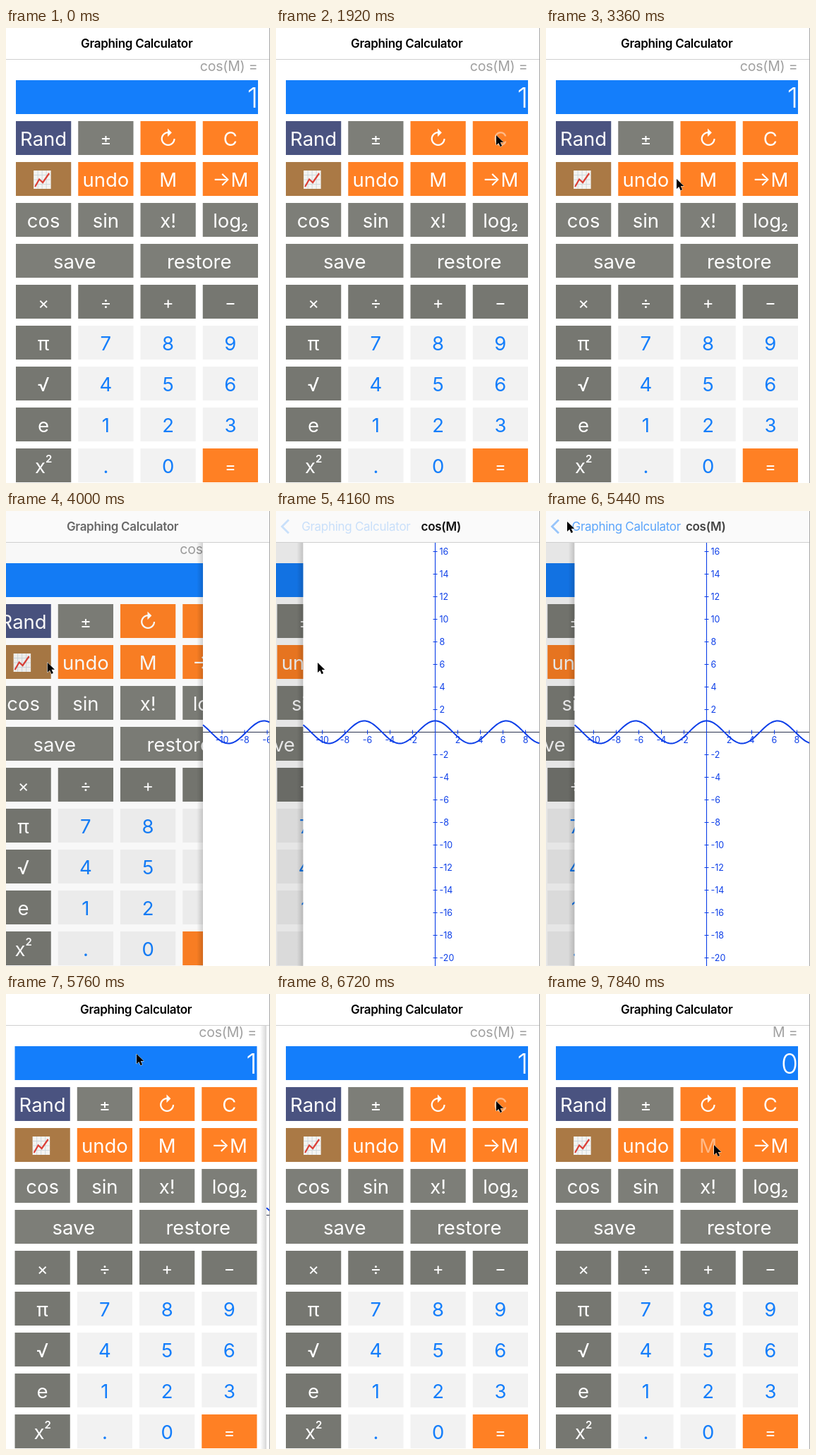
An HTML page for the animation above (8000 ms loop, 374 px wide and 645 px high).

```html
<!DOCTYPE html>
<html lang="en">
<head>
<meta charset="utf-8">
<title>Graphing Calculator</title>
<style>
html, body { margin: 0; width: 100%; height: 100%; overflow: hidden; background: #fff; }
svg { display: block; width: 100vw; height: 100vh; }
text { font-family: Inter, "DejaVu Sans", sans-serif; }
</style>
</head>
<body>
<svg id="stage" viewBox="0 0 374 645">
  <defs>
    <linearGradient id="shade"><stop offset="0" stop-opacity="0"/><stop offset="1" stop-opacity=".16"/></linearGradient>
  </defs>
  <rect width="374" height="645" fill="#fff"/>
  <g id="calc">
    <rect x="14" y="74" width="343" height="48" fill="#147efb"/>
    <text id="formula" x="356.5" y="61" font-size="19.5" letter-spacing="-.2" text-anchor="end" fill="#a0a0a0"></text>
    <text id="value" x="357" y="112.5" font-size="39" font-weight="300" text-anchor="end" fill="#fff"></text>
  </g>
  <rect id="dim" width="374" height="645"/>
  <g id="graph">
    <rect x="-9" width="9" height="645" fill="url(#shade)"/>
    <rect width="374" height="645" fill="#fff"/>
  </g>
  <rect id="bar" width="374" height="44" fill="#fff"/>
  <path d="M0 44.5H374" stroke="#cfcfcf"/>
  <path id="chevron" d="M18 12.5L8.5 22L18 31.5" fill="none" stroke="#147efb" stroke-width="2.8"/>
  <text id="home" y="28" font-size="17" font-weight="600" letter-spacing="-.3">Graphing Calculator</text>
  <text id="back" y="28" font-size="17" letter-spacing="-.3" fill="#147efb">Graphing Calculator</text>
  <text id="plotTitle" y="28" font-size="17" font-weight="600" letter-spacing="-.3" text-anchor="middle" fill="#111">cos(M)</text>
  <path d="M373.5 0V645" stroke="#a8a8a8"/>
  <path id="pointer" d="M0 0V14L3.3 11L5.7 16.2L8.1 15.1L5.8 10H10.2Z" fill="#000" stroke="#fff" stroke-width="1" paint-order="stroke"/>
</svg>
<script>
const $ = id => document.getElementById(id);
const DURATION = 8000, STEP = 160, WIDTH = 374;
const PUSH = 3946, POP = 5409;

function add(parent, tag, attrs, content) {
  const el = document.createElementNS("http://www.w3.org/2000/svg", tag);
  for (const key in attrs) el.setAttribute(key, attrs[key]);
  if (content !== undefined) el.textContent = content;
  parent.append(el);
  return el;
}
const set = (id, attrs) => {
  for (const key in attrs) $(id).setAttribute(key, attrs[key]);
};

// Keypad
const GRAY = "#7d7e78", DARK = "#767771", ORANGE = "#ff8024", LIGHT = "#f2f2f2", BLUE = "#147efb";
const ROWS = [
  ["Rand", "±", "↻", "C"],
  ["chart", "undo", "M", "→M"],
  ["cos", "sin", "x!", "log"],
  ["save", "restore"],
  ["×", "÷", "+", "−"],
  ["π", "7", "8", "9"],
  ["√", "4", "5", "6"],
  ["e", "1", "2", "3"],
  ["x", ".", "0", "="]
];
const FILLS = { Rand: "#4a5380", chart: "#aa7945" };
const labels = {};

function keyFill(name, row, col) {
  if (FILLS[name]) return FILLS[name];
  if (["↻", "C", "undo", "M", "→M", "="].includes(name)) return ORANGE;
  if (row > 4 && col > 0) return LIGHT;
  return row > 3 ? DARK : GRAY;
}

function chartIcon(parent, x, y) {
  const g = add(parent, "g", { transform: `translate(${x - 12.5} ${y - 13})` });
  add(g, "rect", { width: 24.5, height: 26, fill: "#f4f4f2" });
  add(g, "path", { d: "M0 6.5H24.5M0 13H24.5M0 19.5H24.5M6 0V26M12 0V26M18 0V26", stroke: "#c9d3da", "stroke-width": .8 });
  add(g, "path", { d: "M2 23L8 12.5L13 17L22 4", fill: "none", stroke: "#dc4038", "stroke-width": 2.2 });
  return g;
}

ROWS.forEach((names, row) => names.forEach((name, col) => {
  const wide = names.length === 2;
  const width = wide ? 166.5 : 78.25;
  const x = 14 + col * (width + 10), y = 132 + row * 58;
  const fill = keyFill(name, row, col), cx = x + width / 2;
  add($("calc"), "rect", { x, y, width, height: 48, fill });
  if (name === "chart") {
    labels[name] = chartIcon($("calc"), cx - 1.5, y + 25);
    return;
  }
  const operator = "±×÷+−=".includes(name);
  const label = add($("calc"), "text", {
    x: cx, y: y + (operator ? 33.5 : 34.5), "text-anchor": "middle",
    "font-size": operator ? 24 : 27.5, fill: fill === LIGHT ? BLUE : "#fff"
  }, name);
  const small = { "font-size": 15, "font-weight": 600 };
  if (name === "log") add(label, "tspan", { ...small, dy: 5 }, "2");
  if (name === "x") add(label, "tspan", { ...small, dy: -15 }, "2");
  labels[name] = label;
}));

// Plot: 16 px per unit
const OX = 187, OY = 313.5, UNIT = 16, INK = "#0d3fe8";
let ticks = "", curve = "";
const tickLabel = (x, y, n, anchor) =>
  add($("graph"), "text", { x, y, "font-size": 12.5, "text-anchor": anchor, fill: INK }, n);
for (let n = -20; n <= 16; n += 2) {
  if (!n) continue;
  const x = OX + n * UNIT, y = OY - n * UNIT;
  ticks += `M${OX - 3} ${y}h6`;
  tickLabel(OX + 6, y + 4.5, n, "start");
  if (Math.abs(n) <= 10) {
    ticks += `M${x} ${OY - 3}v6`;
    tickLabel(x, OY + 15.5, n, "middle");
  }
}
for (let x = 0; x <= WIDTH; x += 2)
  curve += `${x ? "L" : "M"}${x} ${(OY - UNIT * Math.cos((x - OX) / UNIT)).toFixed(2)}`;
add($("graph"), "path", { d: `M0 ${OY}H${WIDTH}`, stroke: "#2b3350" });
add($("graph"), "path", { d: `M${OX} 44V645${ticks}`, stroke: INK, "stroke-width": 1.1 });
add($("graph"), "path", { d: curve, fill: "none", stroke: INK, "stroke-width": 2 });

// Pointer stops: time, x, y
const STOPS = [
  [1280, 380, 205], [1760, 314, 156], [1920, 312, 152], [2240, 312, 152],
  [2880, 250, 192], [3360, 185, 214], [3680, 58, 214], [4160, 59, 215],
  [4640, 56, 196], [5120, 31, 18], [5440, 30, 15], [5760, 185, 85],
  [6400, 312, 152], [7040, 312, 152], [7520, 240, 213], [7840, 238, 214]
];
const PRESSES = [["C", 1760, 2240], ["chart", 3680, 3920], ["C", 6720, 7040], ["M", 7680, 8000]];

const clamp = v => Math.max(0, Math.min(1, v));
// Remaining share of a critically damped spring
const spring = ms => { const z = Math.max(0, ms) * .018; return (1 + z) * Math.exp(-z); };

function pointerAt(t) {
  const i = STOPS.findIndex(s => s[0] >= t);
  if (i < 0) return STOPS[STOPS.length - 1].slice(1);
  if (i === 0) return [400, 205];
  const [t0, x0, y0] = STOPS[i - 1], [t1, x1, y1] = STOPS[i];
  const p = (t - t0) / (t1 - t0), k = p * p * (3 - 2 * p);
  return [x0 + (x1 - x0) * k, y0 + (y1 - y0) * k];
}

function draw(t) {
  const popping = t >= POP, since = t - (popping ? POP : PUSH);
  const rest = spring(since);
  let hidden = popping ? 1 - rest : rest;
  if (hidden > .999) hidden = 1;
  const shown = 1 - hidden;

  set("calc", { transform: `translate(${-.3 * WIDTH * shown})` });
  set("dim", { opacity: .11 * shown });
  set("graph", { transform: `translate(${WIDTH * hidden})`, visibility: shown ? "visible" : "hidden" });
  set("bar", { fill: shown > .05 ? "#fafafa" : "#fff" });

  const slide = 27 + 79 * hidden;
  const backAlpha = popping ? clamp(1 - since / 100) : clamp((since - 180) / 160);
  const homeAlpha = popping ? clamp((since - 60) / 240) : clamp(1 - since / 130);
  const plotAlpha = popping ? clamp(1 - since / 140) : clamp(since / 180);
  set("home", { x: slide, opacity: homeAlpha });
  set("back", { x: slide + 1, opacity: backAlpha });
  set("chevron", { opacity: popping ? clamp(.6 - since / 180) + .4 * (since < 0) : backAlpha });
  set("plotTitle", { x: 206 + (popping ? 187 : 270) * hidden, opacity: plotAlpha });

  $("formula").textContent = t < 7040 ? "cos(M) =" : t < 7680 ? "" : "M =";
  $("value").textContent = t < 7040 ? "1" : "0";
  for (const name of ["C", "chart", "M"]) {
    const down = PRESSES.some(([key, from, to]) => key === name && t >= from && t < to);
    labels[name].setAttribute("opacity", down ? .45 : 1);
  }
  set("pointer", { transform: `translate(${pointerAt(t)})` });
}

const start = performance.now();
function tick() {
  const t = (performance.now() - start) % DURATION;
  draw(Math.floor(t / STEP) * STEP);
  requestAnimationFrame(tick);
}
tick();
</script>
</body>
</html>
```
